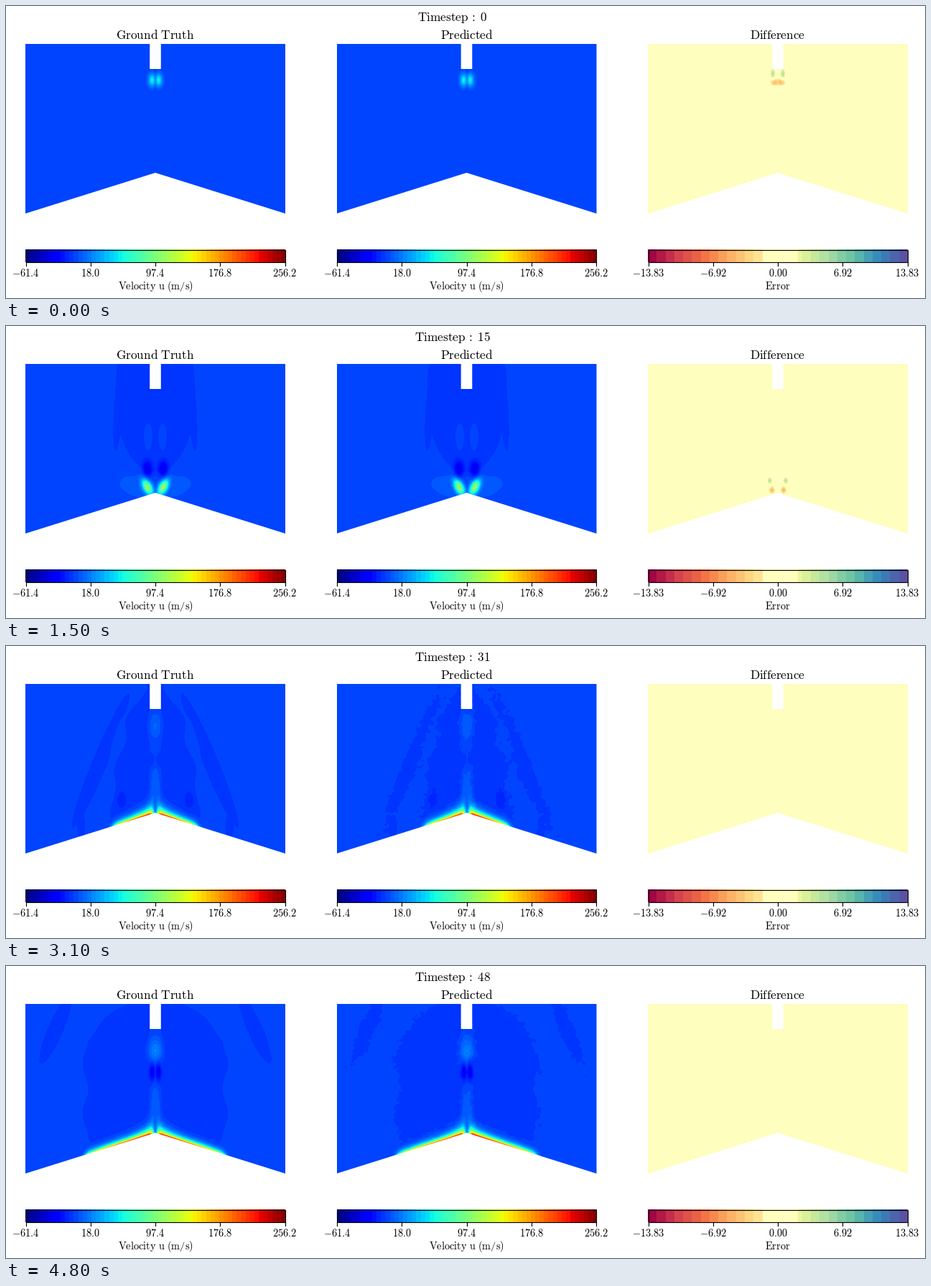
These frames come from a looping animation (1280x408 px, 4.9 s). A matplotlib script:

```python
import numpy as np
import matplotlib.pyplot as plt
from matplotlib.animation import FuncAnimation
from matplotlib.colors import ListedColormap
from matplotlib.patches import Polygon, Rectangle

plt.rcParams["mathtext.fontset"] = "cm"

FRAMES, INTERVAL = 49, 100
LEVELS = 59
HALF, TOP, APEX, BOTTOM = 181, 53, 233, 290
NOZZLE_HALF, NOZZLE_END = 7.8, 88
U_MIN, U_MAX, ERR = -61.4, 256.2, 13.83
SHAPE = BOTTOM - TOP, 2 * HALF


def wall(dx):
    return APEX + dx * (BOTTOM - APEX) / HALF


X, Y = np.meshgrid(np.arange(2 * HALF) + 0.5 - HALF,
                   np.arange(TOP, BOTTOM) + 0.5)
DX = np.abs(X)
DEPTH = np.maximum(wall(DX) - Y, 0)


def ramp(t, start, end):
    return min(max((t - start) / (end - start), 0), 1)


def pulse(t, start, peak, end):
    return min(ramp(t, start, peak), 1 - ramp(t, peak, end))


def sigmoid(v):
    return 1 / (1 + np.exp(-np.clip(v, -40, 40)))


def radius(cx, cy, a, b, shear=0):
    return np.hypot((DX - cx - shear * (Y - cy)) / a, (Y - cy) / b)


def gauss(*blob):
    return np.exp(-radius(*blob) ** 2 / 2)


def disk(*blob):
    return sigmoid((1 - radius(*blob)) * 6)


def smooth_noise(cell=3):
    rng = np.random.default_rng(5)
    rows, cols = (n // cell + 1 for n in SHAPE)
    noise = np.kron(rng.normal(size=(rows, cols)), np.ones((cell, cell)))
    noise = noise[:SHAPE[0], :SHAPE[1]]
    for axis in (0, 1):
        noise = sum(np.roll(noise, s, axis) for s in range(-2, 3)) / 5
    return np.clip(noise / noise.std(), -1.9, 1.9)


NOISE = smooth_noise()


def head(t):
    """Height of the falling jet head."""
    return min(103.5 + 8.1 * t, APEX)


def reach(t):
    """How far the jet has spread along the wall."""
    s = t - 15
    return 14 + 3.1 * s - 0.018 * s * s


def jet_head(t):
    y = head(t)
    core = (50 + 0.25 * t * t) * (1 - ramp(t, 15, 19))
    halo = 5 * (1 - ramp(t, 15, 20))
    return (core * gauss(4.5 + 0.43 * t, y, 3.2 + 0.09 * t,
                         6 + 3 * pulse(t, 0, 9, 20), -0.35 * ramp(t, 11, 15))
            + halo * disk(6 + 1.2 * t, y, 7 + 1.3 * t,
                          11 + 10 * pulse(t, 0, 8, 24), -0.04 * t))


def trailing_lobes(t):
    dx = max(11, 0.8 * reach(t))
    y = min(head(t) - 30 + 0.4 * t, wall(dx) - 18)
    return -30 * pulse(t, 2, 16, 36) * gauss(dx, y, 4.5, 8)


def center_column(t):
    light = 13 * pulse(t, 2, 8, 14) + 20 * ramp(t, 16, 48)
    grow = ramp(t, 26, 37)
    split = 4 * (1 - ramp(t, 23, 31))
    return (light * gauss(0, 100 + 0.38 * t, 7, 11)
            - 27 * ramp(t, 26, 48) * gauss(4, 170 - 22 * grow, 3, 5 + 4 * grow)
            + 5 * ramp(t, 18, 24) * disk(split, 194, 7, 32))


def light_lenses(t):
    s = t - 15
    outward = disk(10 + 5.5 * s, 155 + 4.7 * s, 6, 20, 0.3 * ramp(t, 15, 22))
    inner = disk(55, 125, 5, 28, 0.35)
    return 5 * (min(1, 2 * pulse(t, 10, 20, 30)) * outward
                + min(1, 2 * pulse(t, 29, 37, 47)) * inner)


def plume(t):
    """Slow zone that follows the jet head, then shrinks to the nozzle."""
    width = 60 * min(t / 16, 1 - ramp(t, 16, 35))
    end = min(head(t) - 20, 210 - 80 * ramp(t, 16, 23))
    span = np.where(Y > 100, max(end - 100, 5), 150)
    half = width * np.sqrt(np.clip(1 - ((Y - 100) / span) ** 2, 0, 1))
    return sigmoid((half - DX - 1) / 2)


def rebound(t):
    """Slow zone that grows upward from the wall."""
    narrow = 1 - ramp(t, 23, 40)
    half = reach(t) * (1 - narrow * (1 - np.clip((Y - TOP) / 150, 0, 1)))
    half *= np.sqrt(np.clip((Y - 45) / 60, 0, 1))
    half += 4 * np.sin(Y / 11 + t / 6)
    return ramp(t, 17, 22) * sigmoid((half - DX) / 2.5)


def waves(t):
    s = t - 15
    first = disk(52 + 4 * s, 120 + 3 * s, 5.5, 52, 0.06)
    first *= ramp(t, 12, 14) * (1 - ramp(t, 24, 27))
    s = t - 31
    second = disk(76 + 3.7 * s, 160 - 4.2 * s, 11, 90 - 2.6 * s, 0.41)
    second *= ramp(t, 27, 30)
    dx = 1.75 * reach(t)
    patch = disk(max(dx, 0), wall(dx) - 13, 5.5, 6 + 0.4 * t)
    patch *= ramp(t, 18, 20) * (1 - ramp(t, 39, 42))
    return np.maximum.reduce([first, second, patch])


def slow_zone(t):
    open_core = sigmoid((DX - 28 * ramp(t, 23, 31) + 20) / 1.5)
    return -5 * np.maximum(waves(t),
                           np.maximum(plume(t), rebound(t)) * open_core)


def wall_jet(t):
    length = max(reach(t), 10)
    along = 0.1 + 0.9 * (1 - np.exp(-(DX / 4.5) ** 2))
    along *= 1 - 0.55 * np.minimum(DX / length, 1) ** 2.5
    thickness = 3.7 + 5 * np.exp(-DX / 14)
    return (240 * np.sqrt(ramp(t, 15, 22)) * along
            * sigmoid((length - DX) / 2.2) * np.exp(-DEPTH / thickness))


def velocity(t):
    return (slow_zone(t) + wall_jet(t) + jet_head(t) + trailing_lobes(t)
            + center_column(t) + light_lenses(t))


def error(t):
    y = head(t)
    over = gauss(7 + 0.27 * t, y - 9, 2.4, 5.5 - 0.13 * t)
    under = gauss(4 + 0.27 * t, y + 3 + 9 * pulse(t, 0, 8, 16),
                  4.5 - 0.13 * t, 3.5)
    return 4.6 * (1 - ramp(t, 15, 21)) * (over - under)


def banded(name):
    return plt.get_cmap(name)((np.arange(LEVELS) + 0.5) / LEVELS)


def paired(colors, first=26, last=34):
    """Merge bands in pairs, with one wide band in the middle."""
    i = np.arange(LEVELS)
    index = np.where(i < first, i // 2 * 2, (i + 1) // 2 * 2)
    index[first:last] = LEVELS // 2
    return colors[np.minimum(index, LEVELS - 1)]


JET = ListedColormap(banded("jet"))
SPECTRAL = ListedColormap(paired(banded("Spectral")))

fig = plt.figure(figsize=(12.8, 4.08), dpi=100, facecolor="white")
ax = fig.add_axes([0, 0, 1, 1])


def roman(s):
    return r"$\mathrm{%s}$" % s.replace(" ", r"\ ")


def label(x, y, s, size=10.37):
    return ax.text(x, y, roman(s), size=size, ha="center", va="baseline")


def domain(cx):
    right = [(NOZZLE_HALF, NOZZLE_END), (NOZZLE_HALF, TOP), (HALF, TOP),
             (HALF, BOTTOM), (0, APEX)]
    left = [(-x, y) for x, y in reversed(right[:-1])]
    return Polygon([(cx + x, y) for x, y in right + left],
                   transform=ax.transData)


def panel(column, title, caption, lo, hi, digits, cmap):
    cx = 208 + 433.5 * column
    x0, x1 = cx - HALF, cx + HALF
    style = dict(cmap=cmap, interpolation="nearest", aspect="auto")
    field = ax.imshow(np.zeros(SHAPE), vmin=lo, vmax=hi,
                      extent=(x0, x1, BOTTOM, TOP), **style)
    field.set_clip_path(domain(cx))
    ax.imshow(np.arange(LEVELS)[None], extent=(x0, x1, 358, 340), **style)
    ax.add_patch(Rectangle((x0 + 0.5, 340.5), 2 * HALF - 1, 17.5,
                           fill=False, lw=0.83))
    label(cx, 46, title, 12.45)
    label(cx, 396, caption)
    for f in np.linspace(0, 1, 5):
        x = x0 + 0.5 + f * (2 * HALF - 1)
        ax.plot([x, x], [358, 363], color="black", lw=0.83)
        label(x, 378, f"{lo + f * (hi - lo):.{digits}f}")
    return field


SPEED = ("Velocity u (m/s)", U_MIN, U_MAX, 1, JET)
truth = panel(0, "Ground Truth", *SPEED)
guess = panel(1, "Predicted", *SPEED)
diff = panel(2, "Difference", "Error", -ERR, ERR, 2, SPECTRAL)
heading = label(622, 21, "", 12.45)
ax.set(xlim=(0, 1280), ylim=(408, 0))
ax.axis("off")


def update(t):
    u = velocity(t)
    truth.set_data(u)
    guess.set_data(u + NOISE * ramp(t, 16, 23))
    diff.set_data(error(t))
    heading.set_text(roman(rf"Timestep\,:\;{t}"))
    return truth, guess, diff, heading


anim = FuncAnimation(fig, update, frames=FRAMES, interval=INTERVAL,
                     repeat=True, repeat_delay=0, blit=False)
plt.show()
```
